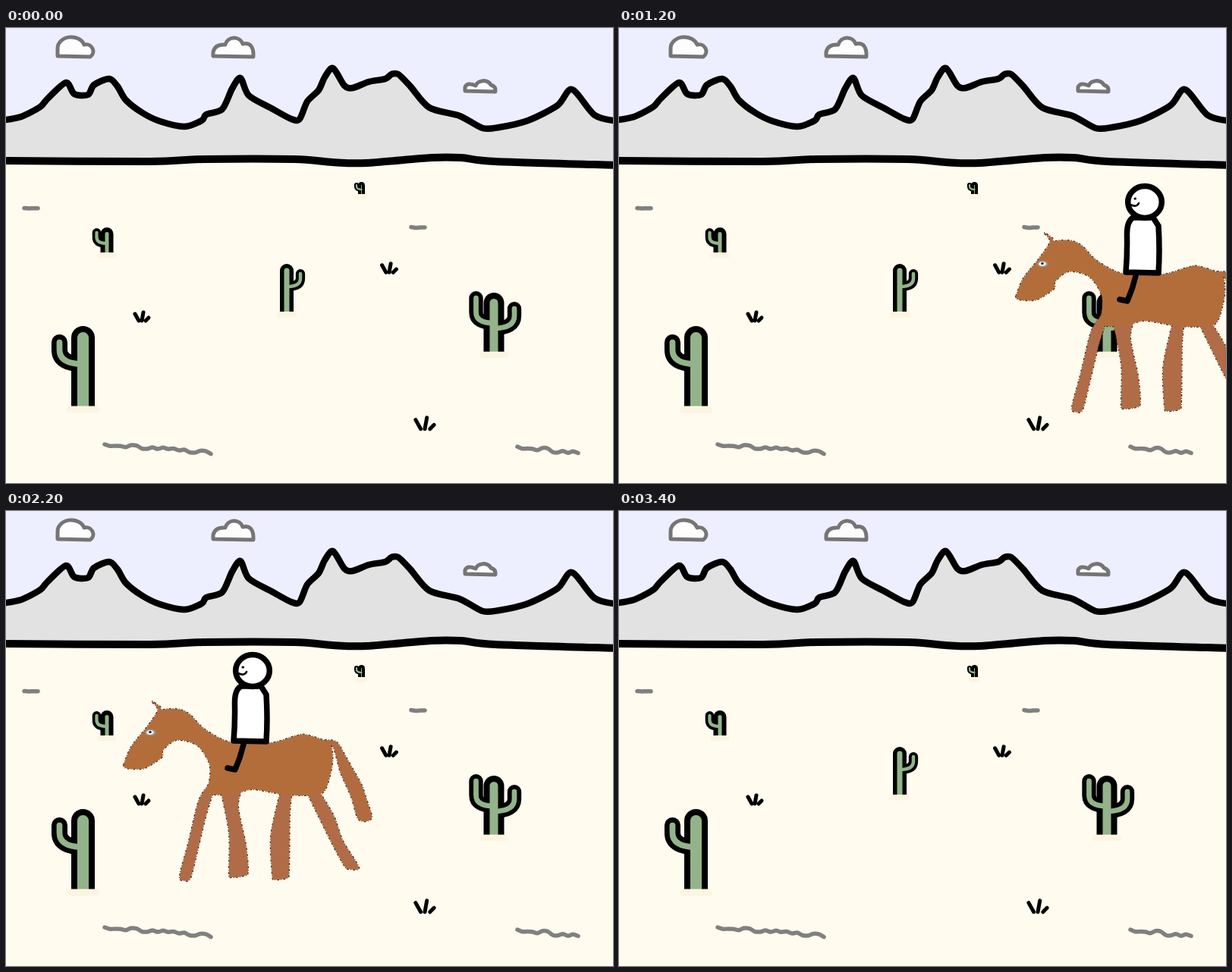
Animation of 800 by 600 pixels, one loop 5.4 s. Source, as an HTML page:

```html
<!DOCTYPE html>
<html lang="en">
<head>
<meta charset="utf-8">
<title>Desert ride</title>
<style>
html, body { margin: 0; width: 100%; height: 100%; overflow: hidden; background: #fffbee; }
svg { display: block; }
</style>
</head>
<body>
<svg width="800" height="600" viewBox="0 0 800 600" fill="none" stroke-linecap="round" stroke-linejoin="round">
  <rect width="800" height="600" fill="#fffbee"/>
  <rect width="800" height="176" fill="#eeeffe"/>
  <g id="scene"></g>
  <g id="ride">
    <g id="edge" stroke="#3d2b20" stroke-width="2" stroke-dasharray="3 2 1 2" stroke-linecap="butt"></g>
    <g id="horse"></g>
    <ellipse cx="190.5" cy="292" rx="7.5" ry="4.5" fill="#9b8d86"/>
    <ellipse cx="190" cy="292" rx="5" ry="3" fill="#f4f6f8"/>
    <circle cx="190" cy="291.5" r="1.8" fill="#26323c"/>
    <g stroke="#000" stroke-width="7.5">
      <path d="M313,308 Q309,325 302,341 L292,339"/>
      <path d="M310,231 Q301,235 301.500,255 Q302,280 300,303 L343,304 Q345,275 343,242 L336,231Z" fill="#fff"/>
      <ellipse cx="325" cy="210.500" rx="22.300" ry="21" fill="#fff"/>
      <path d="M312,206 h.5" stroke-width="3"/>
      <path d="M306,214 Q314,218 317,212" stroke-width="2.6"/>
    </g>
  </g>
</svg>
<script>
const $ = id => document.getElementById(id);
const scene = $('scene'), ride = $('ride');

// Smooth path through "x,y x,y ..." points
function curve(text) {
  const p = text.trim().split(/\s+/).map(s => s.split(',').map(Number));
  const at = i => p[Math.max(0, Math.min(p.length - 1, i))];
  let d = 'M' + p[0];
  for (let i = 0; i < p.length - 1; i++) {
    const [a, b, c, e] = [at(i - 1), at(i), at(i + 1), at(i + 2)];
    const c1 = b.map((v, k) => v + (c[k] - a[k]) / 7);
    const c2 = c.map((v, k) => v - (e[k] - b[k]) / 7);
    d += `C${c1} ${c2} ${c}`;
  }
  return d;
}

function draw(parent, d, attrs = {}) {
  const el = document.createElementNS('http://www.w3.org/2000/svg', 'path');
  el.setAttribute('d', d);
  for (const k in attrs) el.setAttribute(k, attrs[k]);
  parent.appendChild(el);
}

const line = (d, width, stroke = '#000') => draw(scene, d, { stroke, 'stroke-width': width });

// Mountains and horizon
const ridge = curve(`-6,122 20,117 45,104 55,93 79,72 90,87 108,88 116,75 136,67 147,77 158,95
  180,112 203,123 235,130 258,122 264,114 285,107 298,80 309,66 320,89 350,106 376,120 387,120
  397,97 412,82 420,65 431,53 446,76 457,79 478,71 500,67 508,61 517,61 533,77 558,105 598,116
  628,132 650,131 688,122 727,102 746,81 776,115 806,123`);
draw(scene, ridge + 'V176H-6Z', { fill: '#e2e2e2' });
line(ridge, 8.5);
line(curve('-6,175 190,176 260,173 380,173 430,177 475,178 560,171 600,171 645,176 806,181'), 10);

// Clouds
[
  'M68,37 V27 A18,15 0 0 1 103,22 A9.5,9 0 0 1 111,38Z',
  'M273,37 V32 Q275,21 289,22 A12,12 0 0 1 312,21 Q327,18 326,38Z',
  'M605,83 V78 Q608,71 619,76 A11,10 0 0 1 639,75 Q646,77 645,84Z'
].forEach(d => draw(scene, d, { fill: '#fdfdfd', stroke: '#757575', 'stroke-width': 5 }));

// Each arm: x, top, elbow height
function cactus(x, top, base, width, outline, ...arms) {
  const armWidth = width * .68;
  const trunk = `M${x},${base} V${top + width / 2}`;
  const limbs = arms.map(([ax, ay, elbow]) => {
    const bend = elbow - Math.abs(x - ax) * .6;
    return `M${ax},${ay + armWidth / 2} V${bend} Q${ax},${elbow} ${x},${elbow}`;
  }).join('');
  line(limbs, armWidth);
  line(trunk, width);
  line(limbs, width * .25, '#93b38a');
  line(trunk, width - outline * 2, '#93b38a');
  draw(scene, `M${x - width},${base} h${width * 2} v${width} h${-width * 2}Z`, { fill: '#fffbee' });
  line(`M${x - width * .55},${base + 4} h${width * 1.1}`, 4 + width / 6, '#fdf5e1');
}
cactus(101.5, 393, 499, 31, 8, [70.5, 404, 443]);
cactus(643, 349, 427, 27, 8, [619.5, 347, 389], [670, 361, 396]);
cactus(370, 311, 374, 18, 5.5, [388, 318, 341]);
cactus(133, 263, 296, 17, 6, [119.5, 264, 284]);
cactus(468.5, 203, 219, 9, 4, [462, 204, 213]);

// Grass
const grass = (x, y, s) =>
  line(`M${x},${y} m${-9 * s},${-4 * s} l${5 * s},${9 * s} m${6 * s},${-11 * s} l${-2 * s},${11 * s} m${9 * s},${-4 * s} l${-4 * s},${4 * s}`, 5);
grass(179, 381, 1);
grass(505, 317, 1.05);
grass(552, 522, 1.35);

// Wobbly marks in the sand
function scribble(x, y, length, drop, wobble) {
  const steps = Math.ceil(length / 7);
  const pts = [];
  for (let i = 0; i <= steps; i++) {
    const u = i / steps;
    pts.push(`${x + length * u},${y + drop * u + wobble * Math.sin(i * i * 1.7)}`);
  }
  line(curve(pts.join(' ')), 5.5, '#808080');
}
scribble(24, 237.5, 18, 0, .5);
scribble(534, 262.5, 18, 0, 1);
scribble(130, 549, 140, 11, 1.7);
scribble(674, 552, 80, 9, 2);

// Horse
const tail = `420,302 436,305 450,328 468,360 474,377 482,402 478,408 470,409 463,404
  455,377 441,345 432,313 424,308`;
const legs = [
  '275,365 264,400 253,445 243,484 234,487 229,481 241,435 253,385 262,367',
  '311,366 306,390 316,440 319,475 314,481 297,483 294,478 294,425 283,368',
  '377,368 374,400 373,475 370,484 354,486 351,480 349,430 358,385 363,368',
  '413,370 432,402 444,435 465,470 452,472 446,468 428,435 396,370'
];
const body = `155,335 165,311 184,287 200,263 192,251 203,258 205,262 215,261 230,262 243,269
  262,288 296,305 348,306 380,297 395,295 424,305 430,318 429,340 419,370 397,375 362,373
  325,367 300,373 274,374 262,370 268,357 268,333 252,309 225,302 207,315 205,325 183,339
  165,340 156,338`;
for (const [pts, fill] of [[tail, '#b16b3f'], ...legs.map(l => [l, '#b06c47']), [body, '#b36d3a']]) {
  const d = curve(pts) + 'Z';
  draw($('edge'), d);
  draw($('horse'), d, { fill });
}

// The ride advances once per step along key poses: step, x, y
const LOOP = 5400, STEP = 200;
const keys = [[1, 637, 20], [4, 485, 19], [6, 368, 19], [8, 238, 2], [11, 0, 0], [13, -176, 1], [16, -450, 1]];

function pose(n) {
  const i = keys.findIndex(k => k[0] >= n);
  if (n < 1 || i < 0) return [900, 0];
  const b = keys[i], a = keys[i - 1] || b;
  const u = a === b ? 0 : (n - a[0]) / (b[0] - a[0]);
  return [1, 2].map(k => a[k] + (b[k] - a[k]) * u);
}

function frame() {
  const [x, y] = pose(Math.floor(performance.now() % LOOP / STEP));
  ride.setAttribute('transform', `translate(${x} ${y})`);
  requestAnimationFrame(frame);
}
frame();
</script>
</body>
</html>
```
